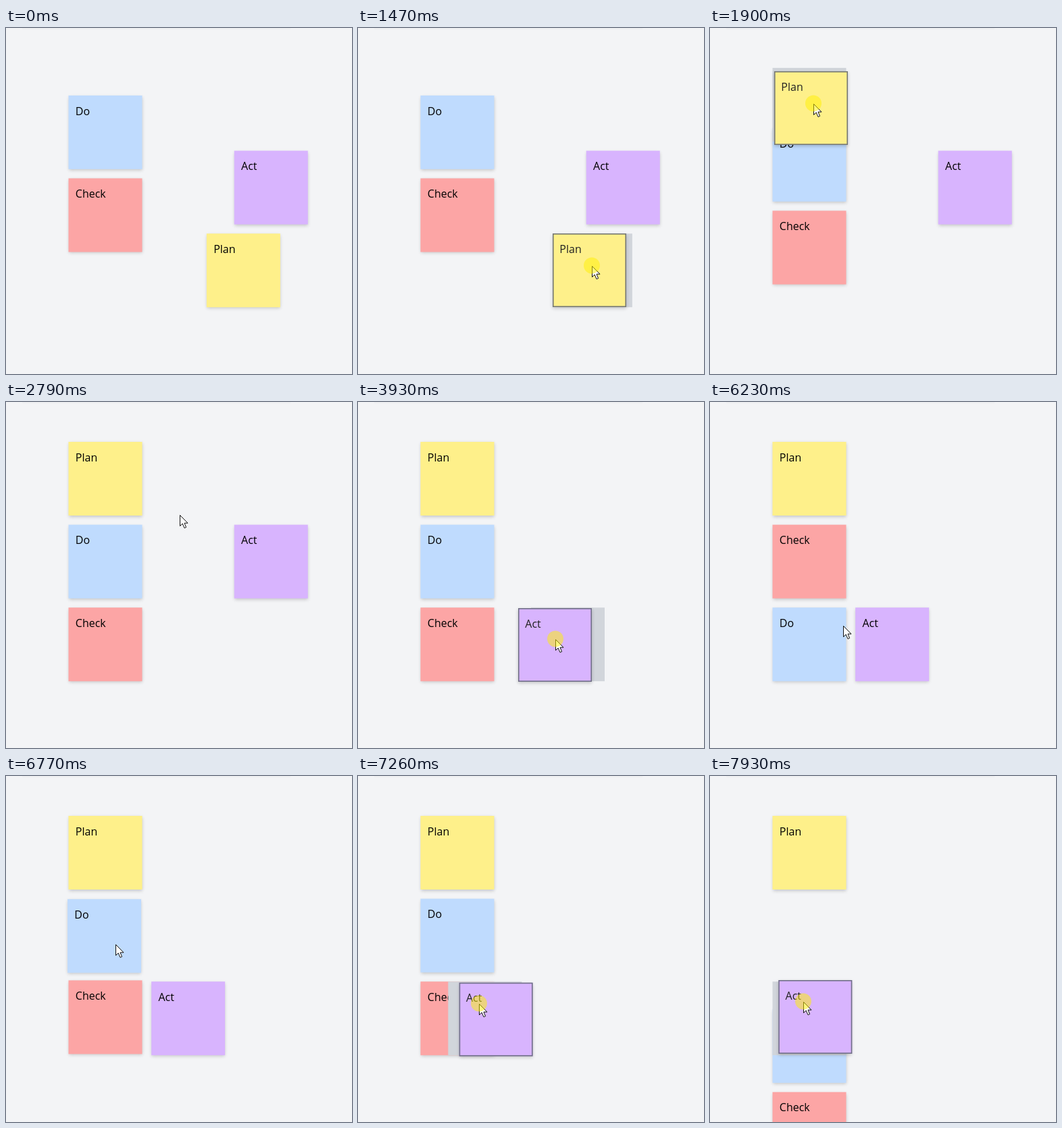
Recreate the animation shown at these times as an HTML page with a canvas. Size 512 by 512 pixels, loop 8 s.

```html
<!DOCTYPE html>
<html lang="en">
<head>
<meta charset="utf-8">
<title>Sticky notes</title>
<style>
html, body { margin: 0; overflow: hidden; background: #f3f4f6; }
canvas { display: block; }
</style>
</head>
<body>
<canvas id="board" width="512" height="512"></canvas>
<script>
const ctx = document.getElementById('board').getContext('2d');
const LOOP = 8000, SIZE = 109, STEP = 40.87, LEFT = 92.5, TOP = 59;
const LAG = 30, GLIDE = 200, SNAP = 60, APPEAR = 530;

const notes = {
  Plan: { color: '#fef08a', home: [5, 6] },
  Do: { color: '#bfdbfe', home: [0, 1] },
  Check: { color: '#fca5a5', home: [0, 4] },
  Act: { color: '#d8b4fe', home: [6, 3] }
};

// stops: [time, x, y] of the dragged note; push: rows other notes of the first
// column give way to; rest: where the pointer waits afterwards
const drags = [
  { name: 'Plan', press: 1400, drop: 2100, grab: [58, 48], land: [0, 0],
    stops: [[1440, 288, 304], [1660, 288, 304], [1790, 95, 64]],
    push: { time: 1850, Do: 3, Check: 6 }, rest: { from: 2500, until: 2790, at: [257, 167] } },
  { name: 'Act', press: 3640, drop: 4570, grab: [55, 46], land: [3, 6],
    stops: [[3890, 237, 305], [4450, 237, 305], [4540, 215, 304]] },
  { name: 'Check', press: 4900, drop: 5350, grab: [58, 46], land: [0, 3],
    stops: [[5190, 99, 170]],
    push: { time: 5350, Do: 6 }, rest: { from: 5690, until: 6230, at: [197, 331] } },
  { name: 'Do', press: 6420, drop: 6700, grab: [58, 48], land: [0, 3],
    stops: [[6600, 87, 184]], push: { time: 6620, Check: 6 } },
  { name: 'Act', press: 7060, drop: LOOP, grab: [37, 32], land: [0, 6],
    stops: [[7200, 153, 306], [7400, 101.3, 302]], push: { time: 7660, Do: 7, Check: 10 } }
];

const arrow = new Path2D('M.5 .5V16.5L4.2 13 7 19.5 9.6 18.4 7 12.2H12Z');
const mix = (a, b, p) => a.map((v, i) => v + (b[i] - v) * p);
const add = (a, b) => a.map((v, i) => v + b[i]);
const cell = ([col, row]) => [LEFT + STEP * col, TOP + STEP * row];
const nearest = ([x, y]) => cell([Math.round((x - LEFT) / STEP), Math.max(0, Math.round((y - TOP) / STEP))]);
const smooth = p => p * p * (3 - 2 * p);
const easeOut = p => 1 - (1 - p) ** 3;

// Turn the drags into pointer keys and note moves
const keys = [{ time: APPEAR, at: [232, 369] }, { time: 1000, at: [232, 369] }];
const moves = {};
for (const name in notes) moves[name] = [{ time: -GLIDE, to: notes[name].home }];
for (const { name, press, drop, grab, land, stops, push, rest } of drags) {
  const hold = (from, until, at) => keys.push({ time: from, at }, { time: until, at });
  hold(press - 80, press, add(cell(moves[name].at(-1).to), grab));
  for (const [time, ...at] of stops) keys.push({ time, at: add(at, grab) });
  keys.push({ time: drop, at: keys.at(-1).at });
  if (rest) hold(rest.from, rest.until, rest.at);
  moves[name].push({ time: drop, to: land });
  for (const other in push) {
    if (other in notes) moves[other].push({ time: push.time, to: [0, push[other]] });
  }
}

function pointer(t) {
  const i = keys.findIndex(k => k.time > t), a = keys[i - 1], b = keys[i];
  return mix(a.at, b.at, smooth((t - a.time) / (b.time - a.time)));
}

// The note follows the pointer a little late
function dragged({ press, grab }, t, lag = LAG) {
  return mix(pointer(Math.max(press, t - lag)), grab, 0).map((v, i) => v - grab[i]);
}

function notePosition(name, t) {
  const i = moves[name].findLastIndex(m => m.time <= t);
  const { time, to } = moves[name][i];
  if (!i || t > time + GLIDE) return cell(to);
  const drag = drags.find(d => d.name === name && d.drop === time);
  const from = drag ? dragged(drag, time - 1) : cell(moves[name][i - 1].to);
  return mix(from, cell(to), easeOut((t - time) / GLIDE));
}

// The placeholder slides between cells: average the snapped position over a short window
function placeholder(drag, t) {
  let sum = [0, 0];
  const samples = 12;
  for (let i = 0; i < samples; i++) {
    sum = add(sum, nearest(dragged(drag, t, SNAP * i / samples)));
  }
  return sum.map(v => v / samples);
}

function shadow(color, blur, offset) {
  ctx.shadowColor = color;
  ctx.shadowBlur = blur;
  ctx.shadowOffsetY = offset;
}

function drawNote(name, [x, y], lifted) {
  shadow('rgba(0,0,0,.2)', 5, 2);
  ctx.fillStyle = notes[name].color;
  ctx.fillRect(x, y, SIZE, SIZE);
  shadow('transparent', 0, 0);
  if (lifted) {
    ctx.strokeStyle = 'rgba(95,100,115,.85)';
    ctx.lineWidth = 1.6;
    ctx.strokeRect(x + .8, y + .8, SIZE - 1.6, SIZE - 1.6);
  }
  ctx.fillStyle = lifted ? '#222' : '#000';
  ctx.fillText(name, x + 10.3, Math.round(y + 28.7));
}

function drawPointer([x, y], pressed) {
  ctx.save();
  ctx.translate(Math.round(x), Math.round(y));
  ctx.fillStyle = '#fff';
  ctx.strokeStyle = '#111';
  ctx.lineWidth = 1;
  ctx.fill(arrow);
  ctx.stroke(arrow);
  if (pressed) {
    ctx.fillStyle = 'rgba(255,240,0,.5)';
    ctx.beginPath();
    ctx.arc(0, -.5, 12, 0, 2 * Math.PI);
    ctx.fill();
  }
  ctx.restore();
}

function draw(t) {
  ctx.fillStyle = '#f3f4f6';
  ctx.fillRect(0, 0, 512, 512);
  ctx.fillStyle = '#eeeff1';
  ctx.fillRect(24, 0, 397, 2);
  ctx.font = '16px "Open Sans", "Noto Sans", sans-serif';

  const drag = drags.find(d => t >= d.press && t < d.drop);
  for (const name in notes) {
    if (name !== drag?.name) drawNote(name, notePosition(name, t));
  }
  if (drag) {
    ctx.fillStyle = '#d1d5db';
    ctx.fillRect(...placeholder(drag, t), SIZE, SIZE);
    drawNote(drag.name, dragged(drag, t), true);
  }
  if (t >= APPEAR) drawPointer(pointer(t), drag);
}

function tick() {
  draw(performance.now() % LOOP);
  requestAnimationFrame(tick);
}
tick();
</script>
</body>
</html>
```
